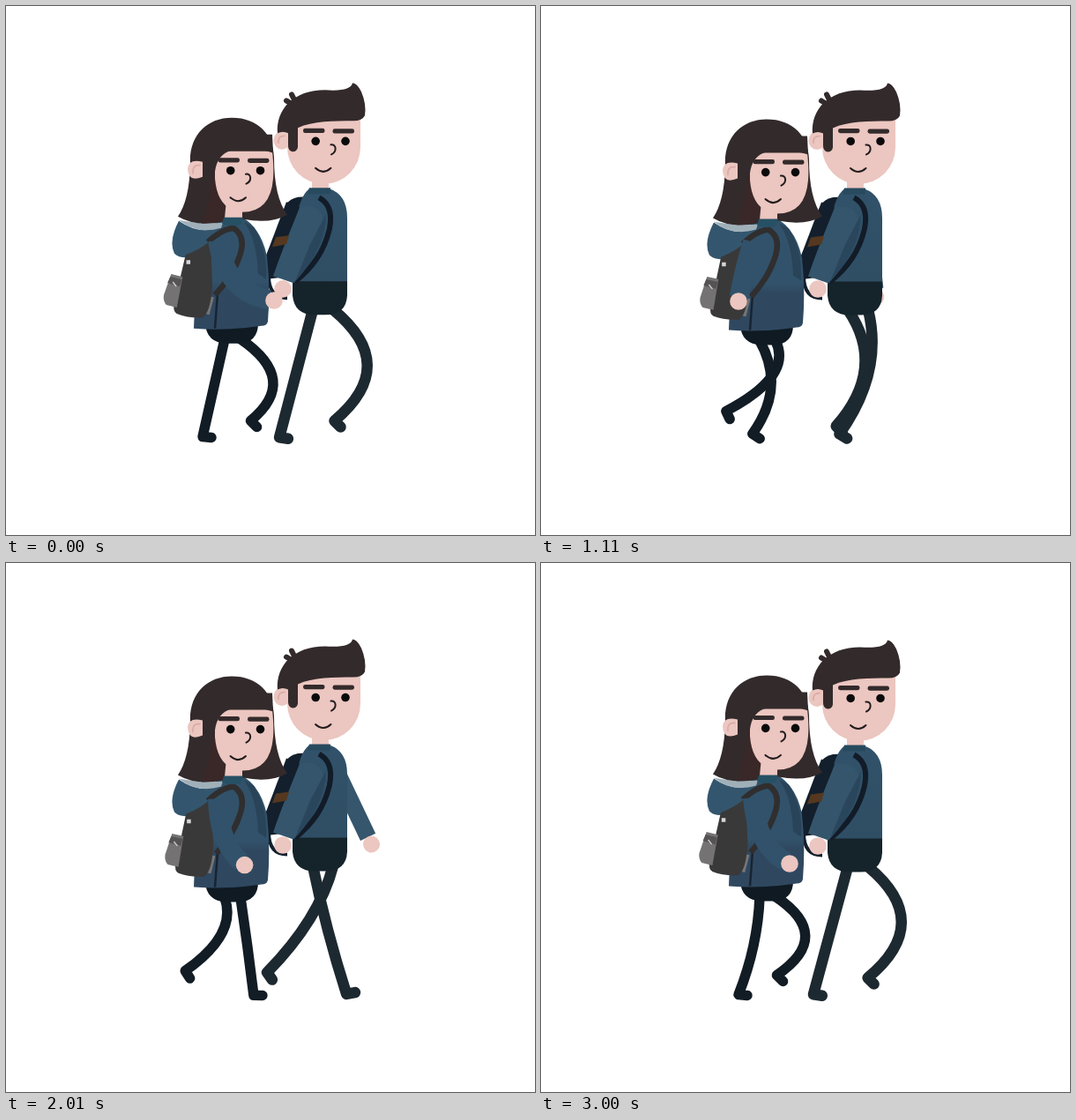
Animation of 600 by 600 pixels, one loop 3.03 s. Source, as an HTML page:

```html
<!DOCTYPE html>
<html lang="en">
<head>
<meta charset="utf-8">
<title>Walking couple</title>
<style>
  html, body { margin: 0; width: 100%; height: 100%; overflow: hidden; background: #fff; }
  svg { display: block; width: 100vw; height: 100vh; }
  .hair { fill: #332a2b; }
  .skin { fill: #ecc6c0; }
  .line { fill: none; stroke: #221d1e; stroke-width: 2; stroke-linecap: round; }
  .ear { fill: none; stroke: #d9a9a3; stroke-width: 1.5; stroke-linecap: round; }
  .leg { fill: none; stroke-linecap: round; stroke-linejoin: round; }
  #man .leg { stroke: #1d2930; stroke-width: 12.5; }
  #woman .leg { stroke: #111c25; stroke-width: 11.5; }
</style>
</head>
<body>
<svg viewBox="0 0 600 600">
  <defs>
    <linearGradient id="sweater" x1="0" y1="0" x2="0" y2="1">
      <stop offset="0" stop-color="#31526a"/>
      <stop offset="1" stop-color="#2f4e64"/>
    </linearGradient>
    <linearGradient id="coat" x1="0" y1="0" x2="0" y2="1">
      <stop offset=".58" stop-color="#31526a"/>
      <stop offset=".66" stop-color="#2f4860"/>
    </linearGradient>
    <g id="face">
      <rect class="hair" x="-23" y="-14.5" width="24.5" height="5.2" rx="2.4"/>
      <rect class="hair" x="10.5" y="-14" width="24.5" height="5.2" rx="2.4"/>
      <circle cx="-8.800" cy="0" r="4.800" fill="#0b0a0b"/>
      <circle cx="25" cy="0" r="4.800" fill="#0b0a0b"/>
      <path class="line" d="M8.500 4C15 3 15.500 12 9 15M-9 30.500Q0 38.500 8.500 30.500"/>
    </g>
  </defs>

  <g id="man">
    <g id="farArm">
      <path d="M368 222V321" stroke="#35566c" stroke-width="19"/>
      <circle class="skin" cx="368" cy="330" r="9.500"/>
    </g>
    <path class="leg" id="manR"/>
    <path class="leg" id="manL"/>
    <g id="manBody">
      <path d="M325 310H387V328Q386 350 362 350H350Q327 350 325 328Z" fill="#15232a"/>
      <path d="M320 222Q328 214 344 217V304L300 309Q291 304 293 288Z" fill="#131f2c"/>
      <path d="M298 306Q298 331 319 331" fill="none" stroke="#131f2c" stroke-width="4"/>
      <path d="M344 207H367Q387 214 387 240V312H326Q330 290 328 250Q332 216 344 207Z" fill="url(#sweater)"/>
      <path class="skin" d="M347 190H366V207H347Z"/>
      <path d="M344 206H368V213H342Z" fill="#284a5e"/>
      <path d="M355 217Q372 226 367 252Q359 288 328 312" fill="none" stroke="#121c28" stroke-width="6"/>
      <path d="M333 228Q360 222 361 250Q356 282 326 314L303 306Q318 262 333 228Z" fill="#34556c"/>
      <path d="M333 228L318 222L293 288Q292 302 301 308Z" fill="#131f2c"/>
      <path d="M306 262L321 260L318 270L302 273Z" fill="#55381f"/>
      <path d="M363 236Q362 276 328 312L345 270Z" fill="#2a465d"/>
      <circle class="skin" cx="314" cy="320.500" r="9.800"/>

      <path class="skin" d="M319 120H402V160A41.500 41.500 0 0 1 319 160Z"/>
      <ellipse class="skin" cx="313" cy="152" rx="9.500" ry="10.500"/>
      <path class="ear" d="M316 147Q308 147 309 155"/>
      <path class="hair" d="M308 144C306 117 326 95 362 95Q391 97 393 87Q398 87 403 97Q409 111 407 124Q404 130 394 130C372 130 348 130 331 138V160Q330 165 325 165Q320 164 320 158V144Q314 141 308 144Z"/>
      <path d="M329 110L324 100M326 112L318 107" fill="none" stroke="#332a2b" stroke-width="6" stroke-linecap="round"/>
      <use href="#face" x="360" y="153"/>
    </g>
  </g>

  <g id="woman">
    <path class="leg" id="womanR"/>
    <path class="leg" id="womanL"/>
    <g id="womanBody">
      <path d="M226 360H286Q286 382 264 383H250Q227 382 226 360Z" fill="#0f1a22"/>
      <path d="M247 240H268Q289 252 296 284Q300 320 297 358Q296 363 290 363Q250 369 213 366Q215 330 212 290Q225 250 247 240Z" fill="url(#coat)"/>
      <path d="M270 245Q285 266 286 304L295 310Q297 276 281 251Z" fill="#294358"/>
      <path d="M240 326L237 366" stroke="#182431" stroke-width="2.500"/>
      <path d="M196 244Q222 262 246 249Q238 275 218 283Q199 289 191 281Q184 267 196 244Z" fill="#33566e"/>
      <path d="M196 243Q220 248 246 246L244 252Q216 260 196 243Z" fill="#a0b0b9"/>
      <g id="bag">
        <path d="M229 268Q245 253 258 252Q274 262 264 287Q257 307 238 328" fill="none" stroke="#302e2f" stroke-width="6.500"/>
        <path d="M234 330L229 350" stroke="#777576" stroke-width="6"/>
        <path d="M204 283Q222 276 232 266L235 318Q233 349 224 354Q208 355 195 350Q190 347 192 338Z" fill="#3a3939"/>
        <path d="M188 305L201 308L195 343L183 340Q179 336 180 329Z" fill="#747273"/>
        <path d="M187 308L200 311L198 319L184 315Z" fill="#555354"/>
        <path d="M190 314L194 319" stroke="#c9c9c9" stroke-width="1.500"/>
        <rect x="205" y="289" width="4.500" height="4.500" fill="#d6d6d6"/>
      </g>
      <path id="sleeve" fill="none" stroke="#31526a" stroke-width="22"/>
      <circle class="skin" id="hand" r="9.800"/>

      <path class="hair" d="M209 180C207 147 228 127 256 127C286 127 303 146 304 172Q304 217 319 237Q300 248 269 242L246 245Q215 251 195 239Q208 220 209 180Z"/>
      <path d="M236 178Q232 222 222 247L250 244V222Z" fill="#3a2829"/>
      <path class="skin" d="M250 220H268V241H248Z"/>
      <path d="M247 240H269L266 248Q256 251 245 247Z" fill="#265064"/>
      <path class="skin" d="M237 165H302Q304 184 303 196Q300 234 268 234Q240 232 237 196Z"/>
      <path class="hair" d="M232 188V146L302 146L303 167Q283 160 262 163Q240 165 237 188Z"/>
      <path class="skin" d="M223 177V194Q207 201 206 185Q207 173 223 177Z"/>
      <path class="ear" d="M220 181Q211 180 212 190"/>
      <use href="#face" x="263.500" y="187"/>
    </g>
  </g>
</svg>
<script>
const LOOP = 3030, STEP = 30;
const MAN = LOOP / 4, WOMAN = LOOP / 5;
const TAU = Math.PI * 2;
const el = id => document.getElementById(id);

// Leg poses: phase, foot x, foot y, knee bulge, foot angle
const manL = [
  [0, 315, 490, 0, 8], [8, 322, 489, 2, 8], [60, 315, 489, 0, 10], [140, 300, 486, 4, 20],
  [225, 295, 478, 20, 40], [277, 302, 473, 24, 52], [352, 338, 480, 26, 45],
  [450, 396, 486, 0, -10], [560, 368, 490, 0, 0], [650, 340, 490, 2, 3], [727, 314, 490, 0, 8]];
const manR = [
  [0, 376, 474, 38, 45], [8, 380, 475, 37, 42], [120, 412, 486, 2, -8], [225, 386, 491, 6, 0],
  [277, 372, 492, 8, 5], [352, 343, 488, 17, 30], [400, 322, 486, 9, 32], [450, 305, 479, 3, 40],
  [510, 300, 466, 14, 58], [590, 325, 463, 30, 62], [670, 358, 470, 37, 50], [727, 374, 474, 38, 45]];
const womanL = [
  [0, 260, 488, 13, 3], [12, 254, 489, 13, 15], [54, 244, 488, 17, 33], [78, 237, 488, 12, 30],
  [126, 229, 490, 5, 5], [156, 228, 489, 0, 5], [282, 209, 484, 0, 10], [310, 205, 477, 3, 32],
  [357, 208, 465, 22, 62], [381, 226, 465, 28, 60], [429, 253, 471, 32, 45],
  [459, 262, 474, 31, 42], [560, 274, 486, 10, 0]];
const womanR = [
  [0, 211, 473, 4, 38], [12, 205, 466, 12, 50], [54, 212, 464, 24, 65], [78, 234, 465, 30, 60],
  [126, 271, 471, 33, 45], [156, 281, 474, 31, 45], [282, 303, 486, 0, -12],
  [330, 291, 490, 0, 0], [450, 256, 490, 3, 0], [540, 229, 486, 2, 16]];
// Near hand: phase, x, y
const handKeys = [
  [0, 212, 336], [12, 213, 334], [54, 224, 335], [78, 246, 347], [126, 282, 341],
  [156, 304, 334], [215, 306, 329], [282, 294, 331], [360, 266, 344], [440, 234, 345], [530, 212, 336]];

// Smooth periodic interpolation through the keys
function sample(keys, p, period) {
  const n = keys.length;
  const at = i => {
    const turn = Math.floor(i / n), k = keys[i - turn * n];
    return [k[0] + turn * period, ...k.slice(1)];
  };
  let i = n - 1;
  while (i > 0 && keys[i][0] > p) i--;
  const [a, b, c, d] = [at(i - 1), at(i), at(i + 1), at(i + 2)];
  const h = c[0] - b[0], u = (p - b[0]) / h, u2 = u * u, u3 = u2 * u;
  return b.slice(1).map((v, j) => {
    const k = j + 1;
    const m0 = (c[k] - a[k]) / (c[0] - a[0]) * h;
    const m1 = (d[k] - b[k]) / (d[0] - b[0]) * h;
    return (2 * u3 - 3 * u2 + 1) * v + (u3 - 2 * u2 + u) * m0
      + (3 * u2 - 2 * u3) * c[k] + (u3 - u2) * m1;
  });
}

function drawLeg(id, hipX, hipY, [x, y, bulge, angle]) {
  const r = angle * Math.PI / 180;
  const dx = 5 * Math.cos(r), dy = 5 * Math.sin(r);
  const ax = x - dx, ay = y - dy;
  const cx = (hipX + ax) / 2 + 2 * bulge, cy = (hipY + ay) / 2;
  el(id).setAttribute('d', `M${hipX} ${hipY}Q${cx} ${cy} ${ax} ${ay}L${x + dx} ${y + dy}`);
}

function drawMan(p) {
  const bob = 0.5 * Math.cos(TAU * (p - 330) / (MAN / 2));
  const swing = 2 + 24 * Math.cos(TAU * (p - 520) / MAN);
  drawLeg('manL', 348, 344 + bob, sample(manL, p, MAN));
  drawLeg('manR', 371, 344 + bob, sample(manR, p, MAN));
  el('manBody').setAttribute('transform', `translate(0 ${bob})`);
  el('farArm').setAttribute('transform', `translate(0 ${bob}) rotate(${-swing} 368 222)`);
}

function drawWoman(p) {
  const wave = Math.cos(TAU * (p - 50) / (WOMAN / 2));
  const bob = 0.4 + 1.2 * wave;
  drawLeg('womanL', 248, 378 + bob, sample(womanL, p, WOMAN));
  drawLeg('womanR', 266, 378 + bob, sample(womanR, p, WOMAN));
  el('womanBody').setAttribute('transform', `translate(0 ${bob})`);
  el('bag').setAttribute('transform', `rotate(${0.4 - 0.8 * wave} 235 262)`);

  const [x, handY] = sample(handKeys, p, WOMAN);
  const y = handY - bob, reach = x - 212;
  const cx = 226 + reach * 0.26, cy = 298 + reach * 0.3;
  const len = Math.hypot(x - cx, y - cy);
  const ex = x - (x - cx) / len * 5, ey = y - (y - cy) / len * 5;
  el('sleeve').setAttribute('d', `M240 266Q${cx} ${cy} ${ex} ${ey}`);
  el('hand').setAttribute('cx', x);
  el('hand').setAttribute('cy', y);
}

function render(now) {
  const t = Math.floor(now % LOOP / STEP) * STEP;
  drawMan(t % MAN);
  drawWoman((t - 450 + WOMAN) % WOMAN);
}

let start;
function tick(now) {
  start ??= now;
  render(Math.max(0, now - start));
  requestAnimationFrame(tick);
}
render(0);
requestAnimationFrame(tick);
</script>
</body>
</html>
```
